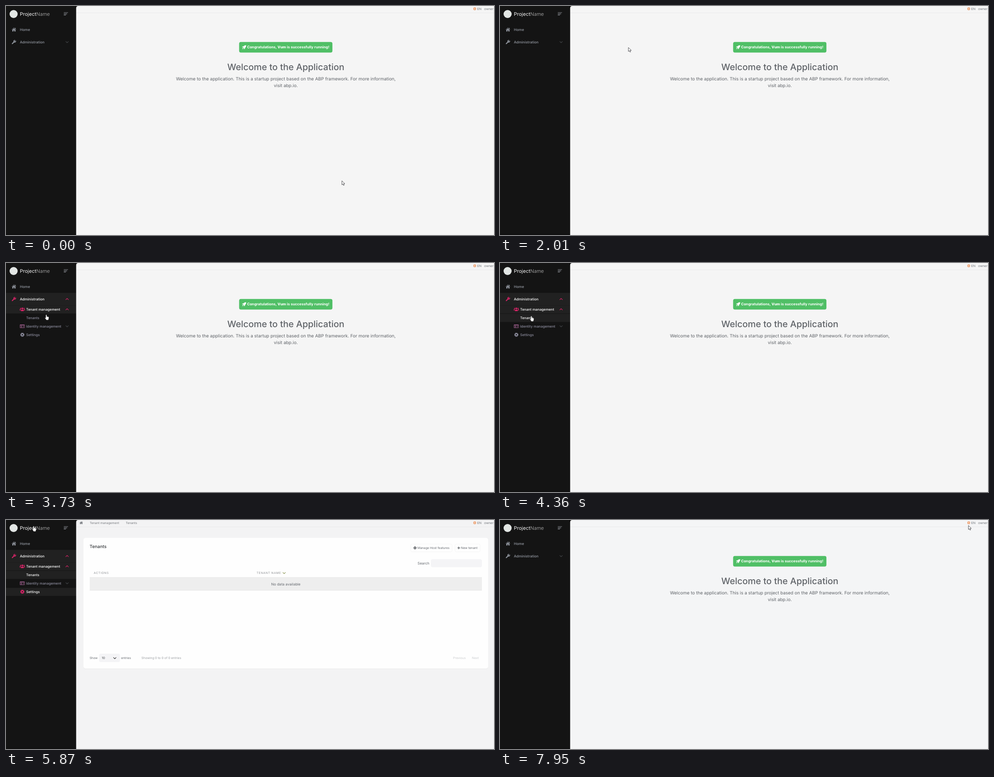
These frames come from a looping animation (1090 px wide and 514 px high, 8000 ms). An HTML page:

```html
<!DOCTYPE html>
<html lang="en">
<head>
<meta charset="utf-8">
<title>Dashboard tour</title>
<style>
  html, body { margin: 0; width: 100%; height: 100%; overflow: hidden; background: #f5f5f5; }
  svg { display: block; width: 100%; height: 100%; font-family: Inter, sans-serif; font-optical-sizing: none; }
  text { white-space: pre; text-rendering: geometricPrecision; }
</style>
</head>
<body>
<svg id="stage" viewBox="0 0 1090 514"></svg>
<script>
const LOOP = 8000;
const GREY = [150, 155, 164], DIM = [140, 140, 157], WHITE = [255, 255, 255];
const PINK = [218, 36, 104], DARK = [66, 68, 72], PLUM = [146, 88, 130];

const stage = document.getElementById('stage');
const $ = id => document.getElementById(id);
const set = (id, attrs) => { for (const k in attrs) $(id).setAttribute(k, attrs[k]); };
const show = (id, on) => set(id, { display: on ? 'inline' : 'none' });
const rgb = c => `rgb(${c.map(Math.round)})`;
const mix = (a, b, k) => rgb(a.map((v, i) => v + (b[i] - v) * k));
const ramp = (t, a, b) => Math.min(1, Math.max(0, (t - a) / (b - a)));
const pulse = (t, a, b, c, d) => ramp(t, a, b) - ramp(t, c, d);

// ---- drawing helpers ----
const text = (x, y, size, fill, str, more = '') =>
  `<text x="${x}" y="${y}" font-size="${size}" fill="${fill}" ${more}>${str}</text>`;
const rect = (x, y, w, h, fill, more = '') =>
  `<rect x="${x}" y="${y}" width="${w}" height="${h}" fill="${fill}" ${more}/>`;
const at = (x, y, body, more = '') => `<g transform="translate(${x} ${y})" ${more}>${body}</g>`;
const line = (d, width) =>
  `<path d="${d}" fill="none" stroke="currentColor" stroke-width="${width}" stroke-linecap="round" stroke-linejoin="round"/>`;
const solid = d => `<path d="${d}" fill="currentColor"/>`;
const dot = (x, y, r) => `<circle cx="${x}" cy="${y}" r="${r}" fill="currentColor"/>`;

const icon = {
  home: solid('M0-4.5L2.4-2.3V-3.9H3.7V-1.2L5 0L4.5 .6L0-3.4L-4.5 .6L-5 0ZM0-2.5L3.6 .8V4.2H1V1.5H-1V4.2H-3.6V.8Z'),
  wrench: line('M-3.5 3.6L1.4-1.3', 2.1) + line('M4.1-2.4A2.1 2.1 0 1 1 2.2-4', 1.7),
  users: dot(-3.9, -2, 1.3) + dot(3.9, -2, 1.3) + dot(0, -1.9, 2) +
    solid('M-3.2 4V2.6Q-3.2 .7-1.4 .7H1.4Q3.2 .7 3.2 2.6V4ZM-6 2.2V1Q-6-.2-4.8-.2H-3Q-3.8 .8-3.9 2.2ZM6 2.2V1Q6-.2 4.8-.2H3Q3.8 .8 3.9 2.2Z'),
  card: line('M-4.7-3.4H4.7V3.4H-4.7Z', 1) + line('M-4.5-2.7H4.5', 1.2) + dot(-2.2, -.3, 1.2) +
    solid('M-4 2.4Q-4 .9-2.2 .9T-.4 2.4Z') + line('M1.2-.4H3.4M1.2 1.4H3.4', .8),
  gear: `<g fill="none" stroke="currentColor"><circle r="2.6" stroke-width="2.1"/>
    <circle r="3.9" stroke-width="1.5" stroke-dasharray="1.75 1.313"/></g>`,
  rocket: solid('M4.2-4.2Q0-4.3-2-1.6H-3.8L-4.6 .6L-2.6 .4L-.4 2.6L-.6 4.6L1.6 3.8V2Q4.3 0 4.2-4.2Z') +
    solid('M-2.7 1.6Q-4.3 2-4.4 4.4Q-2 4.3-1.6 2.7Z'),
  chevron: line('M-2.9-1.4L0 1.5L2.9-1.4', 1.1),
  plus: line('M-2.5 0H2.5M0-2.5V2.5', 1.2),
  ring: '<circle r="2.5" fill="#fbd9c0" stroke="currentColor" stroke-width="1.4"/>' + line('M-2 0H2', .7),
  arrow: '<path d="M.3 .4V9.3L2.4 7.5L3.8 10.7L5.4 10L4 6.9H6.8Z" fill="#fff" stroke="#26262c" stroke-width=".8" stroke-linejoin="round"/>',
  hand: '<path d="M-1.1 1Q-1.1 0 0 0T1.1 1V4L5.1 5Q5.9 5.3 5.8 6.2L5.2 9.5L4.5 12H-.1L-.6 10.8L-3 7.6Q-3.3 6.6-2.4 6.5L-1.1 7.5Z" fill="#fff" stroke="#222" stroke-width=".5"/>'
};

// One sidebar entry, drawn around its own centre line.
function entry(id, y, label, pic, picX, textX, size, arrow, top, height) {
  const chev = arrow ? `<g id="${id}-arrow">${icon.chevron}</g>` : '';
  return at(0, y, `${rect(0, top, 157, height, '#212121', `id="${id}-band" opacity="0"`)}
    ${pic ? at(picX, 0, pic, `id="${id}-icon"`) : ''}
    ${text(textX, 2.9, size, '#888', label, `id="${id}-text" font-weight="500"`)}
    ${chev}`, `id="${id}"`);
}
const sub = (id, y, label, pic, arrow) => entry(id, y, label, pic, 36.5, 45, 7.75, arrow, -8.7, 18);

const sidebar = rect(0, 0, 165, 514, '#141414') + rect(0, 511, 157, 3, '#101010') +
  '<circle cx="17" cy="18" r="9" fill="#e2e6e4"/>' +
  text(31, 22, 11, '#f4f4f4', 'Project<tspan font-weight="300" fill="#b8b8b8">Name</tspan>') +
  at(129, 17.6, line('M.5-2.8H9M.5 0H7M.5 2.8H4.5', 1.1), 'color="#8d9096"') +
  entry('start', 53, 'Home', icon.home, 17.7, 31, 8, false, -14, 28) +
  entry('manage', 81, 'Administration', icon.wrench, 17.5, 31, 7.95, true, -14, 28) +
  `<g id="submenu">${sub('tenant', 104, 'Tenant management', icon.users, true)}
    ${sub('list', 123, 'Tenants', '')}
    ${sub('identity', 123, 'Identity management', icon.card, true)}
    ${sub('settings', 142, 'Settings', icon.gear)}</g>`;

const topbar = '<path id="panel" d="M156.7 514V5Q156.7 0 161.7 0H1090V514Z" fill="#f5f5f5"/>' +
  rect(157, 15, 933, .7, '#e6e6e7') +
  at(1047, 6.3, icon.ring, 'color="#eba276"') +
  text(1052.6, 9.1, 7, '#70747a', 'EN') + text(1068, 9.1, 7.1, '#70747a', 'owner');

const mid = 'text-anchor="middle"';
const welcome = rect(520.7, 80.8, 208.4, 23.6, '#50bf66', 'rx="4"') +
  at(532.2, 92.3, icon.rocket, 'color="#fff"') +
  text(538.4, 95.2, 8.12, '#fff',
    'Congratulations, <tspan font-weight="800">Vum</tspan> is successfully running!', 'font-weight="700"') +
  text(625, 144.2, 19.95, '#5f6368', 'Welcome to the Application', mid + ' font-weight="500"') +
  text(625, 166.5, 9.96, '#5f6368',
    'Welcome to the application. This is a startup project based on the ABP framework. For more information,', mid) +
  text(625, 181.6, 9.96, '#5f6368', 'visit abp.io.', mid);

const button = (x, w) => rect(x, 54, w, 17.5, '#fefefe', 'rx="3" stroke="#f3f3f3" stroke-width=".8"');
const caps = 'letter-spacing=".75"';
const tenants = at(168, 6.2, `<g transform="scale(.72)">${icon.home}</g>`, 'color="#666a70"') +
  text(187, 9.1, 6.81, '#74777c', 'Tenant management') + text(267.4, 9.1, 6.81, '#74777c', 'Tenants') +
  rect(173, 41, 904, 294, '#ededee', 'rx="5"') + rect(173, 40, 904, 293.5, '#fefefe', 'rx="5"') +
  text(186.8, 63.3, 9.93, '#333639', 'Tenants', 'font-weight="500"') +
  button(904, 92.5) + button(1003, 56) +
  at(913.5, 62.6, `<g transform="scale(.72)">${icon.gear}</g>`, 'color="#4d5156"') +
  text(919, 65.2, 6.85, '#666a70', 'Manage Host features') +
  at(1011.3, 62.6, icon.plus, 'color="#4d5156"') + text(1016, 65.2, 6.9, '#666a70', 'New tenant') +
  text(919.3, 99.5, 7.95, '#666a70', 'Search') + rect(949, 88, 114, 18, '#f4f4f6', 'rx="4"') +
  text(196, 121.4, 6.4, '#8b8e92', 'ACTIONS', caps) + text(559.7, 121.4, 6.4, '#8b8e92', 'TENANT NAME', caps) +
  at(621.3, 119, icon.chevron, 'color="#929b5c"') +
  rect(187, 129, 876, 29, '#eeeeee') + rect(187, 128.6, 876, .8, '#e2e2e2') + rect(187, 157.4, 876, .8, '#e2e2e2') +
  text(625, 146.7, 8.05, '#666a70', 'No data available', mid) +
  text(186.7, 311.9, 6.85, '#666a70', 'Show') + rect(208, 300, 46.5, 19, '#f4f4f6', 'rx="4"') +
  text(214, 311.9, 6.9, '#44474b', '10') + at(243, 310, icon.chevron, 'color="#333"') +
  text(257, 311.9, 6.85, '#666a70', 'entries') +
  text(302.6, 312.3, 6.95, '#9a9da1', 'Showing 0 to 0 of 0 entries') +
  text(998.8, 312.3, 6.85, '#c9cbcd', 'Previous') + text(1040.8, 312.3, 6.85, '#c9cbcd', 'Next');

stage.innerHTML = sidebar + topbar + `<g id="welcome">${welcome}</g><g id="tenants">${tenants}</g>
  <g id="pointer"><g id="arrow">${icon.arrow}</g><g id="hand">${icon.hand}</g></g>`;

// ---- pointer path: time, x, y ----
const PATH = [
  [0, 750, 392], [120, 750, 392], [300, 760, 404], [470, 768, 409], [740, 768, 409],
  [1020, 592, 177], [1200, 540, 110], [1440, 976, 47], [1510, 969, 45], [1600, 920, 43],
  [2000, 300, 92], [2200, 102, 101], [2350, 88, 85], [2840, 88, 85], [3300, 88, 103],
  [3590, 89, 107], [3730, 90, 116], [4000, 82, 121], [4360, 70, 119], [4440, 72, 119],
  [4760, 141, 161], [4950, 400, 190], [5180, 700, 150], [5450, 1069, 70], [5850, 62, 14],
  [6080, 60, 12], [6400, 50, 50], [6700, 64, 93], [6840, 67, 100], [7000, 110, 107],
  [7670, 1048, 28], [7950, 1046, 12], [8000, 1046, 12]
];

// Hermite curve whose slope is zero at turning points, so it never overshoots.
function slope(i, k) {
  if (i <= 0 || i >= PATH.length - 1) return 0;
  const rate = j => (PATH[j + 1][k] - PATH[j][k]) / (PATH[j + 1][0] - PATH[j][0]);
  const a = rate(i - 1), b = rate(i);
  return a * b <= 0 ? 0 : 2 * a * b / (a + b);
}
function along(t, k) {
  let i = 0;
  while (i < PATH.length - 2 && t >= PATH[i + 1][0]) i++;
  const h = PATH[i + 1][0] - PATH[i][0], u = (t - PATH[i][0]) / h, v = 1 - u;
  return PATH[i][k] * (1 + 2 * u) * v * v + PATH[i + 1][k] * (3 - 2 * u) * u * u +
    h * u * v * (slope(i, k) * v - slope(i + 1, k) * u);
}

// ---- state at a given time ----
function style(id, lit, base, tint = PINK, iconBase = base) {
  set(id + '-text', { fill: mix(base, WHITE, lit) });
  if ($(id + '-icon')) set(id + '-icon', { color: mix(iconBase, tint, lit) });
}
function chevron(id, open, color) {
  set(id + '-arrow', { transform: `translate(136.5 0) scale(1 ${open ? -1 : 1})`, color });
}

function paint(t) {
  const opened = t >= 2760 && t < 5940, nested = t >= 3590 && opened;
  const onList = t >= 4430 && t < 6080;

  show('welcome', !onList);
  show('tenants', onList);
  show('submenu', opened);
  show('list', nested);
  set('panel', { fill: onList ? '#f3f3f4' : t < 4430 ? '#f5f5f5' : '#f4f5f6' });

  style('start', pulse(t, 6250, 6380, 6450, 6600), GREY);
  style('manage', pulse(t, 2240, 2540, 5900, 5980) + pulse(t, 6700, 6840, 6960, 7300), GREY);
  set('manage-band', { opacity: pulse(t, 2850, 3100, 5900, 5980) });
  const glow = pulse(t, 2240, 2350, 5900, 5980) + pulse(t, 6560, 6680, 7600, 7800);
  chevron('manage', opened, opened ? rgb(PINK) : mix(DARK, WHITE, glow));

  const tenantLit = ramp(t, 3180, 3420);
  style('tenant', tenantLit, DIM);
  set('tenant-band', { opacity: tenantLit });
  chevron('tenant', nested, nested ? rgb(PINK) : mix(DARK, WHITE, tenantLit));

  const listLit = ramp(t, 3740, 3900);
  style('list', listLit, DIM);
  set('list-band', { opacity: listLit });

  set('identity', { transform: `translate(0 ${nested ? 142 : 123})` });
  style('identity', 0, DIM, PINK, nested ? PLUM : DIM);
  chevron('identity', false, rgb(DARK));

  const settingsLit = ramp(t, 4660, 4750);
  set('settings', { transform: `translate(0 ${nested ? 161 : 142})` });
  style('settings', settingsLit, DIM);
  set('settings-band', { opacity: settingsLit });

  const x = along(t, 1), y = along(t, 2), link = x < 152;
  set('pointer', { transform: `translate(${x.toFixed(2)} ${y.toFixed(2)})` });
  show('hand', link);
  show('arrow', !link);
}

const began = performance.now();
function frame() {
  paint((performance.now() - began) % LOOP);
  requestAnimationFrame(frame);
}
frame();
</script>
</body>
</html>
```
